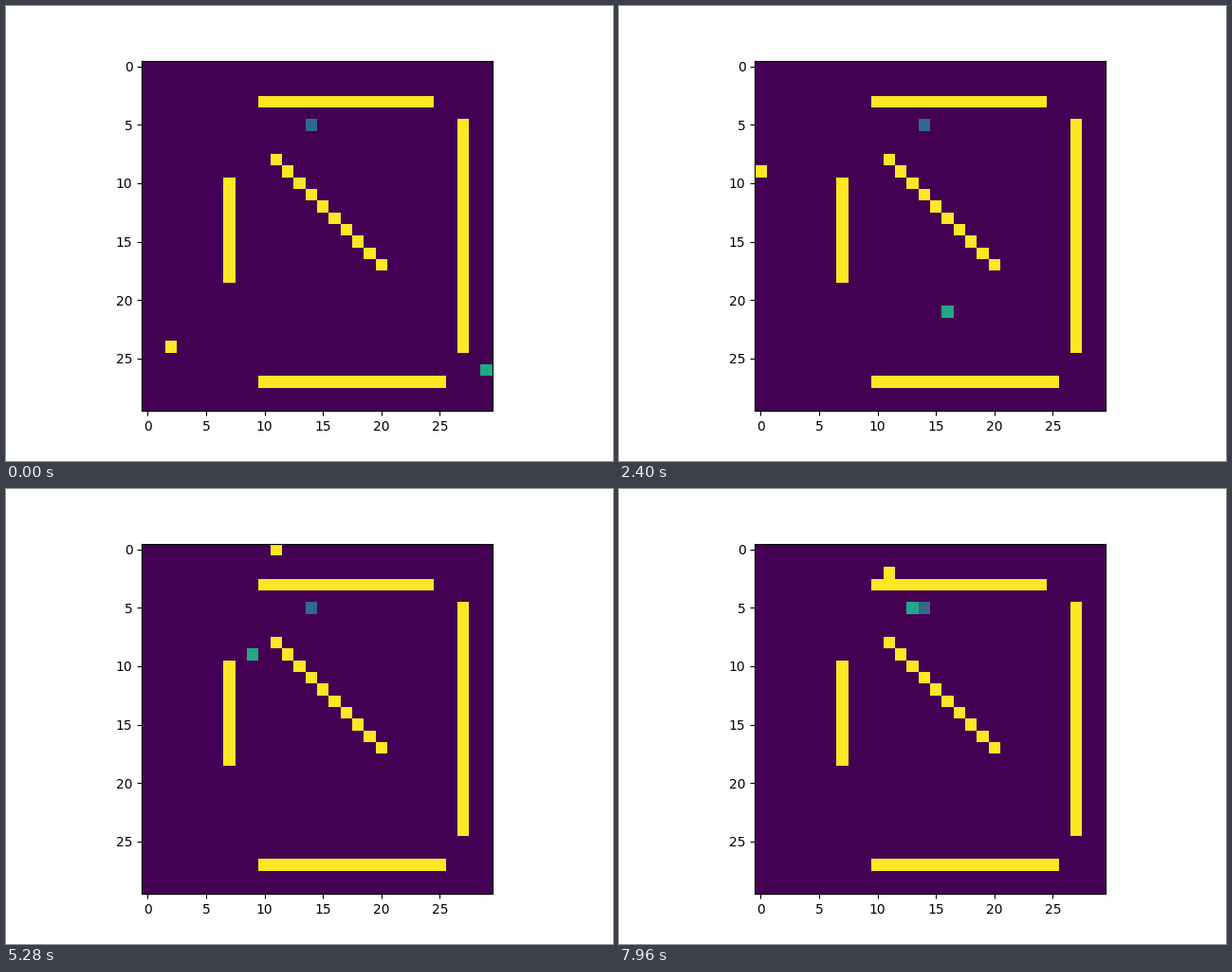
A matplotlib script that plays this animation: 640 px wide and 480 px high, repeating every 8 s.

```python
import numpy as np
import matplotlib.pyplot as plt
from matplotlib.animation import FuncAnimation

SIZE = 30
FRAMES = 200
INTERVAL = 40
TICK = 3  # frames between moves

# Cell values on the viridis scale
EMPTY, GOAL, SEEKER, SOLID = 0, 5, 9, 15

# Key points: frame, column, row
ROAMER_PATH = [(0, 2, 24), (39, 0, 13), (60, 0, 9), (90, 3, 2),
               (108, 6, 3), (135, 12, 0), (156, 17, 2), (198, 11, 2)]
SEEKER_PATH = [(0, 29, 26), (39, 18, 24), (87, 13, 18),
               (108, 10, 15), (132, 9, 9), (162, 13, 5)]


def make_board():
    board = np.full((SIZE, SIZE), EMPTY)
    board[3, 10:25] = SOLID
    board[27, 10:26] = SOLID
    board[10:19, 7] = SOLID
    board[5:25, 27] = SOLID
    steps = np.arange(10)
    board[8 + steps, 11 + steps] = SOLID
    board[5, 14] = GOAL
    return board


def cell_at(path, frame):
    """Row and column of a walker that moves once per tick."""
    t = frame - frame % TICK
    times, cols, rows = zip(*path)
    return round(np.interp(t, times, rows)), round(np.interp(t, times, cols))


BOARD = make_board()

fig, ax = plt.subplots(figsize=(6.4, 4.8), dpi=100)
edges = np.arange(SIZE + 1) - 0.5
mesh = ax.pcolormesh(edges, edges, BOARD, cmap="viridis",
                     vmin=EMPTY, vmax=SOLID)
ax.set(aspect="equal", xlim=(-0.5, SIZE - 0.5), ylim=(SIZE - 0.5, -0.5),
       xticks=range(0, SIZE, 5), yticks=range(0, SIZE, 5))


def update(frame):
    grid = BOARD.copy()
    grid[cell_at(SEEKER_PATH, frame)] = SEEKER
    grid[cell_at(ROAMER_PATH, frame)] = SOLID
    mesh.set_array(grid)
    return (mesh,)


anim = FuncAnimation(fig, update, frames=FRAMES, interval=INTERVAL,
                     repeat=True, repeat_delay=0, blit=False)
plt.show()
```
